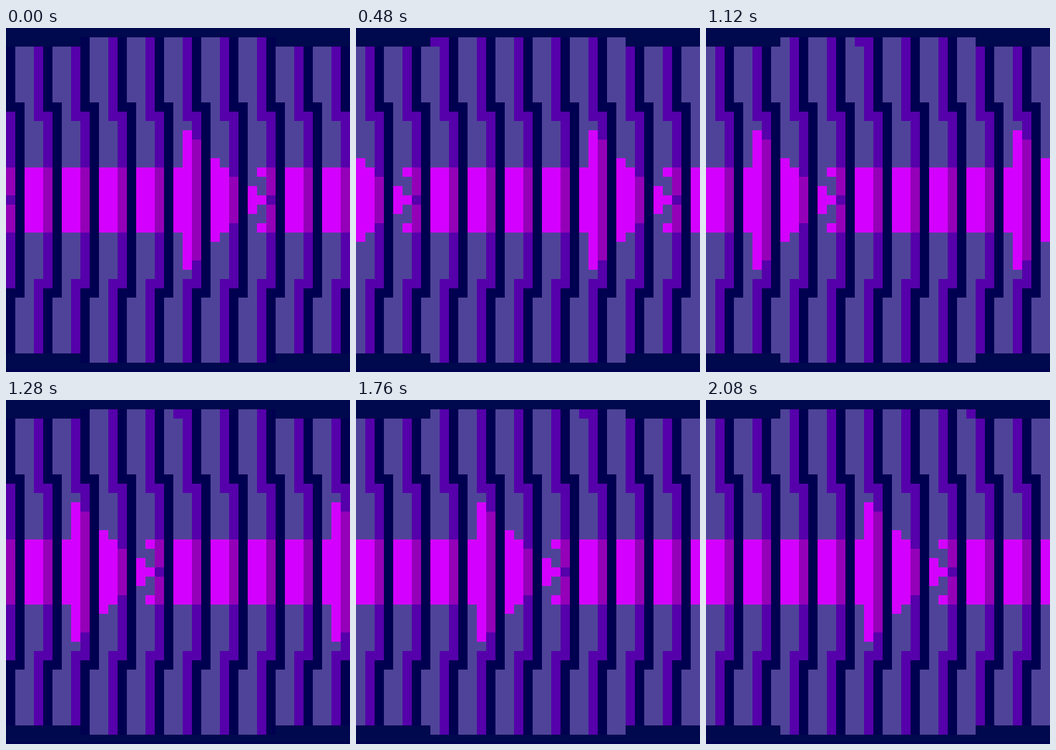
An HTML page with a canvas for the animation above (2.24 s loop, 592 by 592 pixels).

```html
<!DOCTYPE html>
<html lang="en">
<head>
<meta charset="utf-8">
<title>Stripes</title>
<style>
  html, body { margin: 0; width: 100%; height: 100%; overflow: hidden; background: #00084e; }
  canvas { display: block; }
</style>
</head>
<body>
<canvas id="stage" width="592" height="592"></canvas>
<script>
const ctx = document.getElementById('stage').getContext('2d');
const CELL = 16, GRID = 37, MID = 18, PERIOD = 28, STEP_MS = 160, STEPS = 14;
const BACK = '#00084e', GAP = '#000050', LIGHT = '#4f4399', SHADE = '#5500aa';
const GLOW = '#d400ff', GLOW_SHADE = '#9400b8';

const mod = (a, n) => ((a % n) + n) % n;

// Half-height of the glowing band in each column that differs from the usual 3.
const reach = { 19: 7, 20: 6, 22: 4, 24: 2, 26: 1 };

function glows(col, dist) {
  if (col === 27) return dist === 0 || dist === 3;
  if (col === 0) return dist >= 1 && dist <= 3;
  return dist <= (reach[col] ?? 3);
}

// Stripe colour by distance from the middle row; the inner part sits one cell to the right.
function stripe(phase, dist) {
  if (phase === 0) return dist <= 9 ? SHADE : GAP;
  if (phase === 1) return dist <= 10 ? GAP : LIGHT;
  if (phase === 2) return LIGHT;
  return dist <= 8 ? LIGHT : SHADE;
}

function colour(x, y, step) {
  const dist = Math.abs(y - MID);
  if (dist === 18 || (dist === 17 && (x < 8 || x > 28))) return BACK;
  const col = mod(x - 2 * step, PERIOD);
  if (y === 1 && col === 2) return SHADE;
  const base = stripe(col % 4, dist);
  if (base === GAP || !glows(col, dist)) return base;
  return base === LIGHT ? GLOW : GLOW_SHADE;
}

function draw(step) {
  for (let y = 0; y < GRID; y++) {
    for (let x = 0; x < GRID; x++) {
      ctx.fillStyle = colour(x, y, step);
      ctx.fillRect(x * CELL, y * CELL, CELL, CELL);
    }
  }
  ctx.fillStyle = GAP;
  ctx.fillRect(0, 588, 592, 4);
}

const start = performance.now();
let shown = 0;

function tick() {
  const step = Math.floor((performance.now() - start) / STEP_MS) % STEPS;
  if (step !== shown) draw(shown = step);
  requestAnimationFrame(tick);
}

draw(0);
requestAnimationFrame(tick);
</script>
</body>
</html>
```
